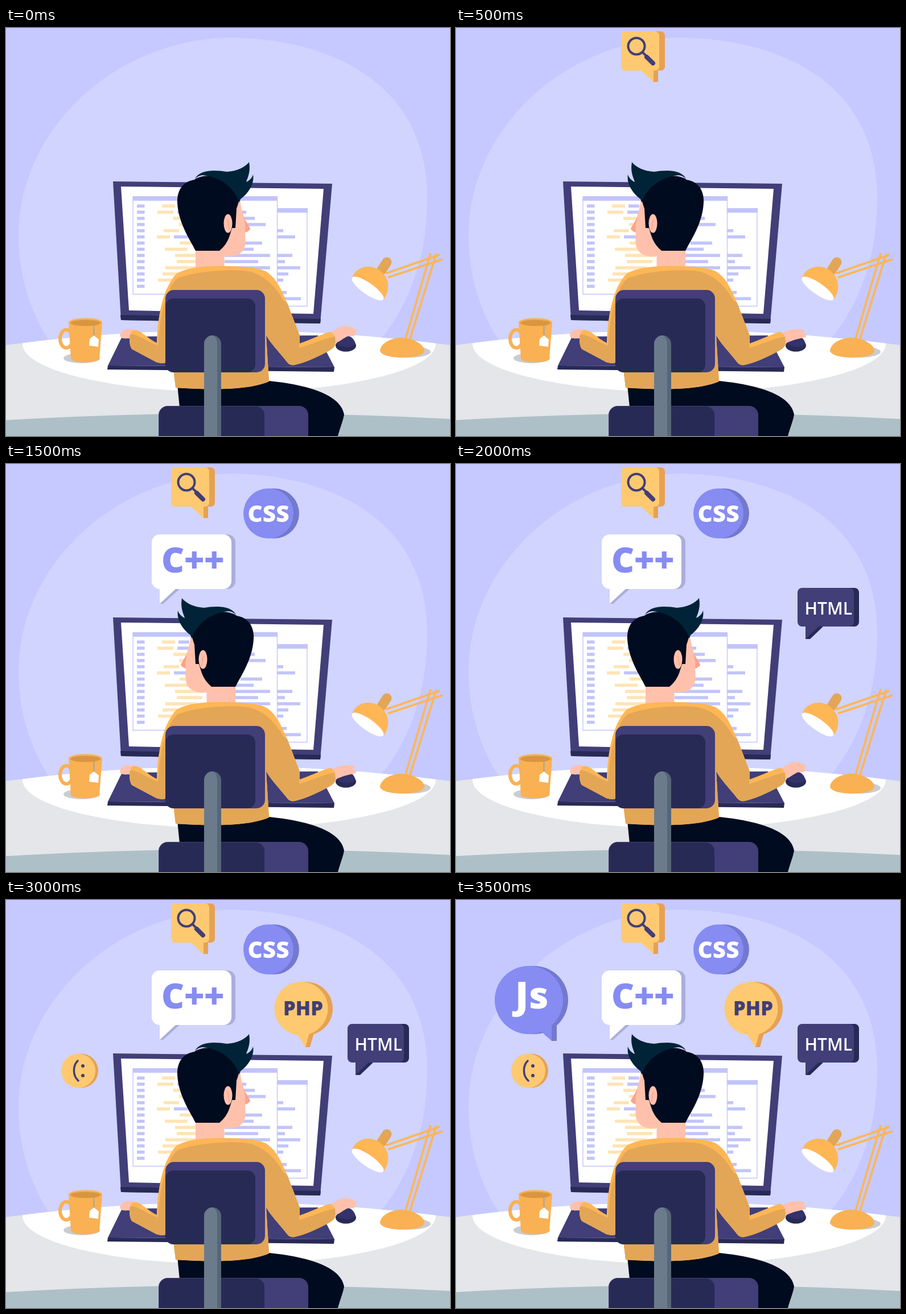
Recreate the animation shown at these times as an HTML page. Size 780 px wide and 718 px high, loop 4 s.

```html
<!DOCTYPE html>
<html lang="en">
<head>
<meta charset="utf-8">
<title>Programmer at a desk</title>
<style>
html, body { margin: 0; width: 100%; height: 100%; overflow: hidden; background: #c5c9ff; }
svg { display: block; width: 780px; height: 718px; }
text { font-family: "Open Sans", "Noto Sans", sans-serif; font-weight: 800; }

.navy { fill: #413e78; } .dark { fill: #282a56; }
.gold { fill: #ffb655; } .ochre { fill: #e3a656; } .amber { fill: #f9b153; }
.sun { fill: #ffc971; } .sunSide { fill: #e7a153; }
.violet { fill: #868cf2; } .violetSide { fill: #7379cf; }
.skin { fill: #ffc1ac; } .ink { fill: #010b1f; } .white { fill: #fff; }
.line { fill: none; stroke: #413e78; stroke-linecap: round; }

/* Each bubble pops in at its own half second and stays until the loop ends. */
.pop { opacity: 0; animation: 4s step-end infinite; }
@keyframes pop1 { 12.5% { opacity: 1 } }
@keyframes pop2 { 25% { opacity: 1 } }
@keyframes pop3 { 37.5% { opacity: 1 } }
@keyframes pop4 { 50% { opacity: 1 } }
@keyframes pop5 { 62.5% { opacity: 1 } }
@keyframes pop6 { 75% { opacity: 1 } }
@keyframes pop7 { 87.5% { opacity: 1 } }
#search { animation-name: pop1; }
#css { animation-name: pop2; }
#cpp { animation-name: pop3; }
#html { animation-name: pop4; }
#smile { animation-name: pop5; }
#php { animation-name: pop6; }
#js { animation-name: pop7; }

/* The head turns and the hand moves every half second. */
#head { transform-origin: 0 0; animation: turn 1s step-end infinite; }
@keyframes turn { 50% { transform: matrix(-1, 0, 0, 1, 736, 0) } }
#handUp { animation: hide 1s step-end infinite; }
#handDown { opacity: 0; animation: show 1s step-end infinite; }
@keyframes hide { 50% { opacity: 0 } }
@keyframes show { 50% { opacity: 1 } }
</style>
</head>
<body>
<svg viewBox="0 0 780 718">
  <defs>
    <clipPath id="table"><path d="M0 558Q390 506 780 558V718H0Z"/></clipPath>
  </defs>

  <!-- room -->
  <path fill="#c5c9ff" d="M0 0H780V718H0Z"/>
  <path fill="#d0d4ff" d="M82 560C40 500 22 430 22 365C22 180 190 17 400 17C560 20 740 90 740 300C740 400 710 490 648 560Z"/>
  <g clip-path="url(#table)">
    <path fill="#e4e6e9" d="M0 500H780V718H0Z"/>
    <ellipse class="white" cx="392" cy="556" rx="363" ry="85"/>
  </g>
  <path fill="#aec0c7" d="M0 690Q390 667 780 688V718H0Z"/>

  <!-- monitor -->
  <path class="navy" d="M188 270L573 274L552 520L202 514Z"/>
  <path class="dark" d="M201 505L553 512L552 520L202 514Z"/>
  <path class="white" d="M202 279L558 283L540 503L216 497Z"/>
  <g fill="none" stroke="#c4c6fb" stroke-width="1.4">
    <path d="M477 318H529V489.500H477M223 297H476.500V468.500H223Z"/>
  </g>
  <path fill="#c2c4fa" d="M223 296H477V304H223ZM477 317H530V325H477Z"/>
  <g id="code"></g>

  <!-- mug -->
  <ellipse fill="#c9ccd1" cx="133" cy="581" rx="32" ry="9"/>
  <ellipse cx="106" cy="547" rx="11" ry="16" fill="none" stroke="#f9b153" stroke-width="6"/>
  <path class="amber" d="M110 517L114 583C120 590 158 590 164 583L169 517Z"/>
  <ellipse class="amber" cx="139.500" cy="518" rx="29.500" ry="7.500"/>
  <ellipse fill="#d9963f" cx="139.500" cy="519" rx="26.500" ry="5.500"/>
  <path fill="none" stroke="#9aa3ad" stroke-width="1.800" d="M154.500 522V544"/>
  <path class="white" d="M154.500 541L163 548L162 561L146 559L147 547Z"/>

  <!-- lamp -->
  <ellipse fill="#c9ccd1" cx="709" cy="570" rx="37" ry="10"/>
  <g fill="none" stroke="#ffb655" stroke-width="3.700">
    <path d="M701 550L746 396M709 550L756 397M667 432L762 399M671 439L767 407"/>
  </g>
  <path class="amber" d="M657 567C660 552 680 545 696 545S735 556 735 568C735 576 715 580 696 580S657 576 657 567Z"/>
  <path stroke="#e3a656" stroke-width="17" stroke-linecap="round" d="M660 426L669 412"/>
  <path class="gold" d="M608 440C612 425 630 416 648 422C669 430 680 456 663 478Z"/>
  <ellipse class="white" cx="635.500" cy="458.500" rx="33.500" ry="10" transform="rotate(35 635.500 458.500)"/>

  <!-- keyboard and mouse -->
  <path class="navy" d="M204 543L548 541L577 597L179 594Z"/>
  <path class="dark" d="M179 594L577 597L576 605L178 601Z"/>
  <ellipse class="dark" cx="597" cy="559" rx="18" ry="10.500"/>
  <path fill="#33326a" d="M580 553C583 545 590 541.500 598 541.500C607 542 612 548 614 556C606 564 588 564 580 553Z"/>

  <!-- head -->
  <g id="head">
    <path class="skin" d="M333 385H383.500V426H333Z"/>
    <path class="skin" d="M392 296L411 303C413 318 417 328 419 336L429 353C427 357 424 358 420 360C421 370 421 380 419 386C414 400 398 404 383 401L374 380Z"/>
    <path fill="#fda28d" d="M417 332L429 353C428 357 424 358 420 360C421 351 420 342 417 332Z"/>
    <path class="ink" d="M333 392C325 375 303 345 301 308C300 284 312 270 331 267C345 255 404 255 412 296L405 318L403 352H397L394 362C390 376 384 384 375 392Z"/>
    <path fill="#002338" d="M331 267C340 248 368 250 388 253C406 252 420 245 427 236C430 253 425 262 422 271C429 268 433 262 434 258C437 274 425 292 412 301L410 307C403 285 380 262 345 259C338 260 333 263 331 267Z"/>
    <ellipse class="skin" cx="390" cy="344" rx="7.500" ry="16.500"/>
    <path fill="none" stroke="#fda28d" stroke-width="1.500" d="M388 337C393 341 389 348 393 354"/>
  </g>

  <!-- body -->
  <path class="skin" d="M200 541C201 534 208 529 220 530L231 532L222 547C215 545 208 548 202 545Z"/>
  <path id="handUp" class="skin" d="M566 541C578 530 588 525 597 524C606 526 614 527 615 533C616 540 611 544 605 542C597 541 590 551 577 555Z"/>
  <path id="handDown" class="skin" d="M566 542C578 534 587 530 595 530C604 530 612 530 613 534L609 537C615 538 616 541 614 544C604 547 596 547 577 556Z"/>
  <path class="ink" d="M301 628C360 640 420 632 462 621C530 628 588 645 594 680C592 692 588 700 583 718H310Z"/>
  <path class="gold" d="M300 432C322 420 350 419 380 419C410 419 440 421 456 428C476 440 484 462 494 484L516 541V555C535 549 550 540 568 535C576 535 578 542 579 555C578 562 572 566 560 572C545 580 525 589 507 593C500 594 497 592 493 587C480 570 462 552 457 540L462 622C430 636 370 638 298 633L294 600L281 588C278 591 270 590 264 588L221 565C215 557 216 536 223 532C234 528 250 548 265 554C266 520 272 460 300 432Z"/>
  <path class="ochre" d="M302 440C340 426 400 424 425 428C455 434 474 456 488 480L494 484L516 541L515 563C535 558 555 547 578 543L579 555C578 562 572 566 560 572C545 580 525 589 507 593C500 594 497 592 493 587C480 570 462 552 457 540L462 622C430 636 370 638 298 633L294 600L281 588C278 591 270 590 264 588L221 565C217 558 216 547 218 539C231 538 250 553 267 559C270 520 276 462 302 440Z"/>

  <!-- chair -->
  <rect class="navy" x="268" y="665" width="263" height="75" rx="16"/>
  <rect class="dark" x="269" y="666" width="185" height="74" rx="15"/>
  <rect class="navy" x="280" y="461" width="175" height="145" rx="15"/>
  <rect class="dark" x="280" y="476" width="158" height="130" rx="14"/>
  <path fill="#566678" d="M348 718V556A15 15 0 0 1 378 556V718Z"/>
  <path fill="#6c7b8b" d="M348 718V556A15 15 0 0 1 363 541C368 543 371 549 371 556V718Z"/>

  <!-- bubbles -->
  <g id="search" class="pop">
    <path class="sunSide" d="M347 70H355V95H347Z"/>
    <rect class="sunSide" x="299" y="6" width="68" height="69" rx="7"/>
    <path class="sun" d="M323 73H347V95Z"/>
    <rect class="sun" x="290" y="6" width="67" height="69" rx="7"/>
    <circle class="line" cx="317" cy="32" r="14.500" stroke-width="4"/>
    <path class="line" stroke-width="4" d="M328 43L336 51"/>
    <path class="line" stroke-width="8" d="M335 51L346 62"/>
  </g>
  <g id="css" class="pop">
    <circle class="violetSide" cx="471" cy="87" r="44"/>
    <circle class="violet" cx="461" cy="87" r="44"/>
    <text class="white" x="461" y="102" font-size="40.500" text-anchor="middle">CSS</text>
  </g>
  <g id="cpp" class="pop">
    <g fill="#abaedc">
      <rect x="264" y="124" width="139" height="96" rx="14"/>
      <path d="M270 246L276 246L306 219H280Z"/>
    </g>
    <rect class="white" x="256" y="124" width="140" height="96" rx="14"/>
    <path class="white" d="M270 218V246L299 219Z"/>
    <text class="violet" x="273" y="191" font-size="62">C++</text>
  </g>
  <g id="html" class="pop">
    <rect class="dark" x="610" y="218" width="98" height="68" rx="8"/>
    <path class="dark" d="M614 308H622L646 285H630Z"/>
    <rect class="navy" x="600" y="218" width="99" height="68" rx="8"/>
    <path class="navy" d="M614 284V308L638 285Z"/>
    <text class="white" x="612.500" y="265" font-size="30" style="font-weight:600">HTML</text>
  </g>
  <g id="smile" class="pop">
    <circle class="sunSide" cx="132" cy="300.500" r="30"/>
    <circle class="sun" cx="127" cy="300.500" r="30"/>
    <path class="line" stroke-width="3.500" d="M126 283C117 292 117 309 127 318"/>
    <circle class="navy" cx="135" cy="292" r="3"/>
    <circle class="navy" cx="135" cy="309" r="3"/>
  </g>
  <g id="php" class="pop">
    <circle class="sunSide" cx="527" cy="191" r="47"/>
    <path class="sunSide" d="M526 259H534L541 234H524Z"/>
    <circle class="sun" cx="518.500" cy="191" r="47"/>
    <path class="sun" d="M510 234L526 259L533 234Z"/>
    <text class="navy" x="522" y="203" font-size="34.500" text-anchor="middle">PHP</text>
  </g>
  <g id="js" class="pop">
    <circle class="violetSide" cx="137" cy="176" r="60"/>
    <path class="violetSide" d="M168 248H177V218H160Z"/>
    <circle class="violet" cx="128" cy="176" r="60"/>
    <path class="violet" d="M150 232L168 248V218Z"/>
    <text class="white" x="162.500" y="191" font-size="66" text-anchor="end">Js</text>
  </g>
</svg>
<script>
const code = document.getElementById('code');
const YELLOW = '#ffe4b5', LILAC = '#c2c4fa';

function bar(row, from, to, color) {
  const r = document.createElementNS(code.namespaceURI, 'rect');
  const box = { x: from, y: 310.5 + row * 10.87, width: to - from, height: 5.5, fill: color };
  for (const key in box) r.setAttribute(key, box[key]);
  code.append(r);
}

for (let row = 0; row < 14; row++) bar(row, 230, 243.5, LILAC);

// row, start, end
[[0, 274, 297], [1, 266, 294], [2, 294, 330], [3, 304, 330], [4, 277, 304], [5, 265, 288],
 [6, 305, 330], [7, 279, 319], [8, 297, 352], [9, 300, 345], [10, 280, 335], [11, 275, 320],
 [12, 267, 295]].forEach(b => bar(...b, YELLOW));
[[0, 303, 322], [1, 301, 323], [1, 408, 422], [2, 408, 437], [3, 411, 456], [5, 295, 320],
 [6, 412, 450], [7, 400, 435], [8, 384, 464], [9, 384, 443], [10, 390, 464],
 [4, 477, 487], [5, 477, 508], [8, 477, 503], [9, 477, 490], [10, 477, 517], [11, 477, 496],
 [12, 477, 487], [14, 477, 493], [15, 477, 518]].forEach(b => bar(...b, LILAC));
</script>
</body>
</html>
```
